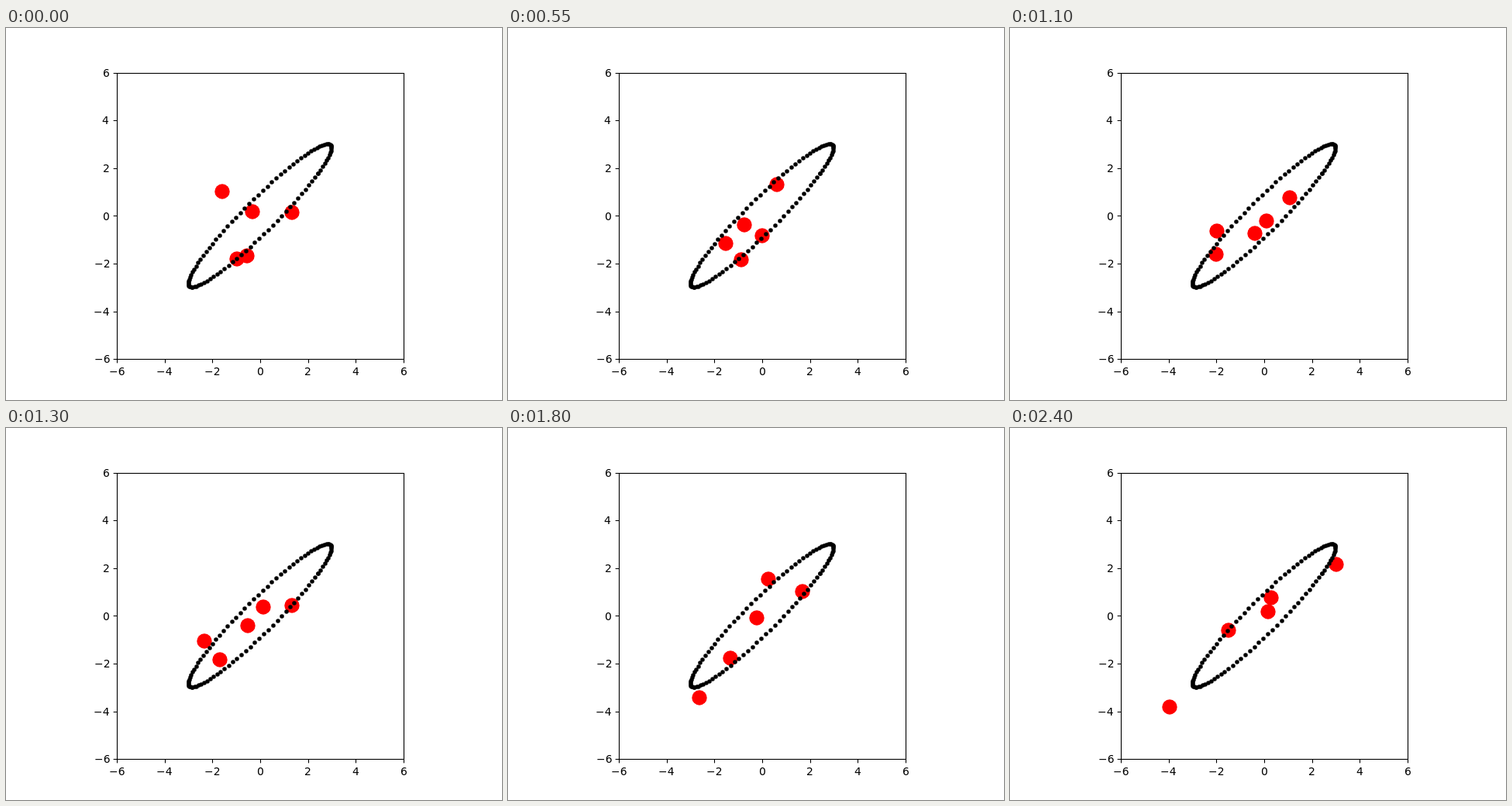
Write an HTML page with a canvas that moves like this. It is 640 px wide and 480 px high and loops after 2.45 s.

```html
<!DOCTYPE html>
<html lang="en">
<head>
<meta charset="utf-8">
<title>Wandering particles</title>
<style>
  html, body { margin: 0; width: 100%; height: 100%; overflow: hidden; background: #fff; }
  canvas { display: block; }
</style>
</head>
<body>
<canvas id="stage" width="640" height="480"></canvas>
<script>
const ctx = document.getElementById('stage').getContext('2d');
const STEP_MS = 50, STEPS = 49, STEPS_PER_LEG = 8;
const UNIT = 30.8, CENTER_X = 328, CENTER_Y = 242.4;
const BALL_RADIUS = 9.72, DOT_RADIUS = 2.78, TICK = 4.86;

// Each particle drifts through a few evenly timed waypoints.
const paths = [
  '318,237 348,208 341,199 367,225 371,231 392,189 421,176',
  '279,211 314,248 278,258 263,267 237,312 254,376 206,360',
  '369,238 327,267 338,261 330,242 341,195 331,202 337,219',
  '298,298 294,279 259,283 271,295 291,308 280,281 282,261',
  '311,294 285,300 333,291 311,258 322,253 320,237 333,237'
].map(path => path.split(' ').map(point => point.split(',').map(Number)));

const toX = x => CENTER_X + x * UNIT;
const toY = y => CENTER_Y - y * UNIT;
const crisp = v => Math.round(v) + 0.5;

function catmullRom(a, b, c, d, t) {
  return b + t / 2 * (c - a + t * (2 * a - 5 * b + 4 * c - d + t * (3 * (b - c) + d - a)));
}

function positionAt(path, step) {
  const last = path.length - 1;
  const leg = Math.min(Math.floor(step / STEPS_PER_LEG), last - 1);
  const t = step / STEPS_PER_LEG - leg;
  const point = i => path[Math.max(0, Math.min(last, i))];
  return [0, 1].map(axis =>
    catmullRom(...[-1, 0, 1, 2].map(offset => point(leg + offset)[axis]), t));
}

function disc(x, y, radius) {
  ctx.beginPath();
  ctx.arc(Math.round(x), Math.round(y), radius, 0, 2 * Math.PI);
  ctx.fill();
}

function line(x1, y1, x2, y2) {
  ctx.beginPath();
  ctx.moveTo(x1, y1);
  ctx.lineTo(x2, y2);
  ctx.stroke();
}

// Aligns the visible ink, not the advance width: 0.5 centres, 1 aligns right.
function label(text, x, baseline, align) {
  const { actualBoundingBoxLeft: left, actualBoundingBoxRight: right } = ctx.measureText(text);
  ctx.fillText(text, Math.round(x - align * (left + right) + left), Math.round(baseline));
}

function drawAxes() {
  const left = crisp(toX(-6)), right = crisp(toX(6));
  const top = crisp(toY(6)), bottom = crisp(toY(-6));
  ctx.strokeStyle = ctx.fillStyle = '#000';
  ctx.lineWidth = 1.11;
  ctx.strokeRect(left, top, right - left, bottom - top);
  ctx.font = '13.889px "DejaVu Sans", sans-serif';
  for (let v = -6; v <= 6; v += 2) {
    const text = String(v).replace('-', '\u2212');
    const x = toX(v), y = toY(v);
    line(crisp(x), bottom, crisp(x), bottom + TICK);
    line(left, crisp(y), left - TICK, crisp(y));
    label(text, x, 448, 0.5);
    label(text, toX(-6) - 2 * TICK, y + 5.2, 1);
  }
}

// Three-sigma contour: a circle mapped by the symmetric root of the covariance.
function drawEllipse() {
  const rho = 0.95, count = 100;
  const major = Math.sqrt(1 + rho), minor = Math.sqrt(1 - rho);
  const same = 1.5 * (major + minor), cross = 1.5 * (major - minor);
  ctx.fillStyle = '#000';
  for (let i = 0; i < count; i++) {
    const angle = 2 * Math.PI * i / (count - 1);
    const c = Math.cos(angle), s = Math.sin(angle);
    disc(toX(same * c + cross * s), toY(cross * c + same * s), DOT_RADIUS);
  }
}

function draw(now) {
  const step = Math.floor(now / STEP_MS) % STEPS;
  ctx.fillStyle = '#fff';
  ctx.fillRect(0, 0, 640, 480);
  ctx.fillStyle = '#f00';
  for (const path of paths) disc(...positionAt(path, step), BALL_RADIUS);
  drawEllipse();
  drawAxes();
}

let start;
function tick(now) {
  start ??= now;
  draw(Math.max(0, now - start));
  requestAnimationFrame(tick);
}
draw(0);
requestAnimationFrame(tick);
</script>
</body>
</html>
```
